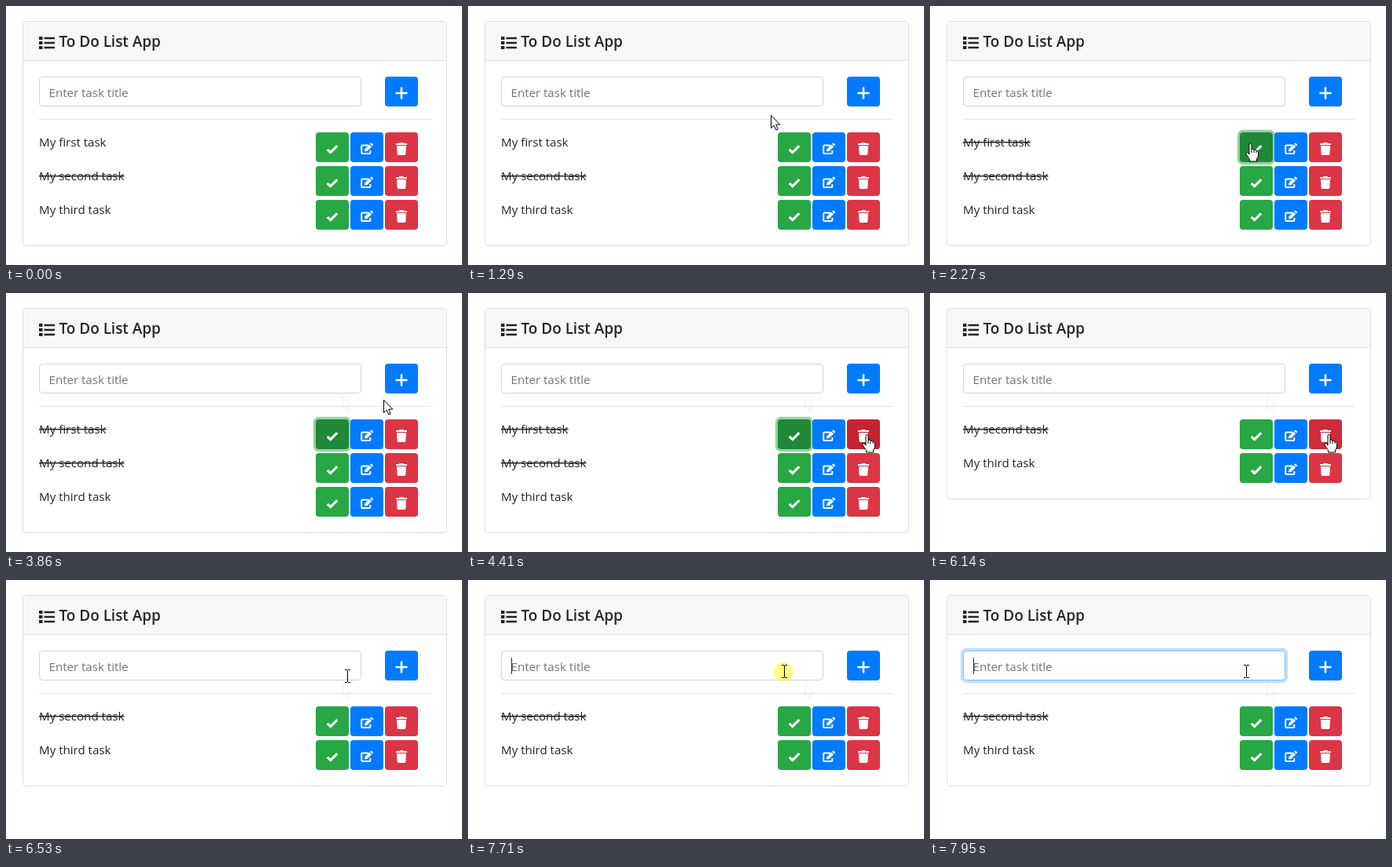
An HTML page that plays this animation: 580 by 330 pixels, repeating every 8000 ms.

```html
<!DOCTYPE html>
<html lang="en">
<head>
<meta charset="utf-8">
<title>To Do List App</title>
<style>
  html, body { margin: 0; width: 100%; height: 100%; overflow: hidden; background: #fff; }
  svg { display: block; width: 580px; height: 330px; }
  text { font: 15.1px "Open Sans", "Noto Sans", sans-serif; fill: #212529; }
  .title { font-size: 18.9px; font-weight: 600; }
  .placeholder { fill: #6c757d; }
  .done { text-decoration: line-through; }
  .pointer { stroke: #000; stroke-linejoin: round; fill: #fff; }
</style>
</head>
<body>
<svg viewBox="0 0 580 330">
  <defs>
    <path id="check" d="M-6.3 .8L-2.2 4.6L6.3 -3.8" fill="none" stroke="#fff" stroke-width="3.2"/>
    <g id="edit">
      <path d="M2 -4.6H-5.8Q-6.8 -4.6 -6.8 -3.6V5Q-6.8 6 -5.8 6H3.3Q4.3 6 4.3 5V2" fill="none" stroke="#fff" stroke-width="2"/>
      <path d="M-3 3.5L-2.6 .2L3.2 -5.6L6.1 -2.7L.3 3.1ZM4 -6.3L5 -7.2Q5.7 -7.7 6.3 -7.2L7.8 -5.7Q8.3 -5 7.8 -4.4L6.9 -3.5Z" fill="#fff"/>
    </g>
    <path id="trash" d="M-7 -7H-3.2L-2.4 -8H2.4L3.2 -7H7V-5H-7ZM-6 -4H6L5.4 6.6Q5.3 8 4 8H-4Q-5.3 8 -5.4 6.6Z" fill="#fff"/>
    <path id="arrow" class="pointer" d="M.5 .5V16.6L4.2 13.2L6.8 19L9.2 18L6.7 12.2H11.8Z"/>
    <g id="hand" class="pointer">
      <path d="M-2 1.8Q-2 .3 -.5 .3T1 1.8V7.3Q3.5 6.5 4 8.3Q6.5 7.5 7 9.3Q9.5 8.8 9.5 11.3V16Q9.5 18 7.5 20V23H-1.5V20.5L-6 13.8Q-6.5 11 -4.3 11.5L-2 14Z"/>
      <path d="M1 7.3V12M4 8.3V12M7 9.3V12" fill="none"/>
    </g>
    <path id="beam" d="M-3 -7.5H0M1 -7.5H4M.5 -7V8M-3 8.5H0M1 8.5H4" fill="none" stroke="#000"/>
  </defs>

  <rect id="card" x="21.5" y="19.5" width="539" height="286" rx="4" fill="#fff" stroke="#dfdfdf"/>
  <path d="M22 69V23.5Q22 20 25.5 20H556.5Q560 20 560 23.5V69Z" fill="#f6f7f7"/>
  <path d="M22 69.5H560" stroke="#dfdfdf"/>
  <path d="M42 41H46.5M42 47H46.5M42 53H46.5" stroke="#212529" stroke-width="4"/>
  <path d="M48.5 41H62M48.5 47H62M48.5 53H62" stroke="#212529" stroke-width="2.6"/>
  <text class="title" x="67.5" y="52">To Do List App</text>

  <rect id="inputRing" x="40.4" y="88.4" width="413.2" height="41.2" rx="5.5" fill="none" stroke="#bfdeff" stroke-width="3.2"/>
  <rect id="input" x="42.5" y="90.5" width="409" height="37" rx="4" fill="#fff"/>
  <text class="placeholder" x="54.5" y="116">Enter task title</text>
  <path id="caret" d="M55.5 99V120" stroke="#333"/>
  <rect x="482" y="90" width="42" height="38" rx="4" fill="#007bff"/>
  <path d="M496.5 111H509.5M503 104.5V117.5" stroke="#fff" stroke-width="2.6" stroke-linecap="round"/>
  <path d="M42 144.5H540" stroke="#e5e5e5"/>

  <g id="rows"></g>
  <use id="ghost" href="#arrow" x="428" y="132" opacity=".05"/>
  <circle id="click" r="12" fill="#ff0" fill-opacity=".5"/>
  <use id="cursor"/>
</svg>
<script>
const LOOP = 8000, TICK = 76, ROW_HEIGHT = 43;
const CLICK_DONE = 2030, CLICK_DELETE = 5920, CLICK_INPUT = 7710;
const REMOVED = 6070;
const bursts = [0, 680, 1530, CLICK_DONE, 3550, 4410, CLICK_DELETE, 6760, CLICK_INPUT];

// Cursor path: time, x, y
const path = [
  [680, 420, 104], [830, 395, 82], [910, 381, 73], [1060, 375, 100],
  [1288, 385, 139], [1440, 408, 175], [3500, 408, 175], [3550, 411, 163],
  [3626, 428, 132], [3702, 447, 131], [3854, 480, 136], [4082, 500, 160],
  [4310, 508, 179], [4410, 508, 180], [6148, 508, 180], [6300, 492, 152],
  [6376, 470, 134], [6528, 434, 122], [6680, 408, 117], [6912, 402, 116]
];

const $ = id => document.getElementById(id);
const set = (el, attrs) => {
  for (const name in attrs) el.setAttribute(name, attrs[name]);
};
const show = (el, visible) => set(el, { display: visible ? 'inline' : 'none' });
const ramp = (t, start) => Math.min(1, Math.max(0, (t - start) / 150));
const within = (t, from, to) => t >= from && t < to;
const mix = (a, b, k) => `rgb(${a.map((v, i) => Math.round(v + (b[i] - v) * k))})`;

const GREEN = [40, 167, 69], DARK_GREEN = [33, 136, 56];
const RED = [220, 53, 69], DARK_RED = [200, 35, 51];

const button = (x, color, icon) => `
  <rect class="${icon}" x="${x}" width="42" height="38" rx="4" fill="${color}"/>
  <use href="#${icon}" x="${x + 21}" y="21"/>`;

$('rows').innerHTML = ['My first task', 'My second task', 'My third task'].map((title, i) => `
  <g>
    <text x="42" y="18" class="${i === 1 ? 'done' : ''}">${title}</text>
    <rect class="ring" x="392.4" y="-1.6" width="45.2" height="41.2" rx="5.5"
      fill="none" stroke="#93d3a2" stroke-width="3.2" opacity="0"/>
    ${button(394, mix(GREEN, GREEN, 0), 'check')}
    ${button(438, '#007bff', 'edit')}
    ${button(482, mix(RED, RED, 0), 'trash')}
  </g>`).join('');
const rows = [...$('rows').children];
const part = (row, name) => rows[row].querySelector(name);

function hold(t) {
  const start = bursts.findLast(b => b <= t);
  return start + Math.floor((t - start) / TICK) * TICK;
}

function cursorAt(t) {
  const next = path.findIndex(p => p[0] > t);
  if (next < 0) return path.at(-1).slice(1);
  if (next === 0) return path[0].slice(1);
  const [t0, x0, y0] = path[next - 1], [t1, x1, y1] = path[next];
  const k = (t - t0) / (t1 - t0);
  return [Math.round(x0 + (x1 - x0) * k), Math.round(y0 + (y1 - y0) * k)];
}

function cursorShape(x, y) {
  if (x < 452 && y >= 90 && y < 128) return '#beam';
  return x >= 394 && x < 524 && y >= 161 && y < 199 ? '#hand' : '#arrow';
}

function draw(time) {
  const t = hold(time);
  const removed = t >= REMOVED;

  rows.forEach((row, i) => set(row, {
    transform: `translate(0 ${161 + (i - removed) * ROW_HEIGHT})`
  }));
  show(rows[0], !removed);
  set($('card'), { height: 286 - removed * ROW_HEIGHT });

  part(0, 'text').classList.toggle('done', t >= CLICK_DONE + TICK);
  set(part(0, '.ring'), { opacity: ramp(t, CLICK_DONE) });
  set(part(0, '.check'), { fill: mix(GREEN, DARK_GREEN, ramp(t, 1440)) });
  set(part(0, '.trash'), { fill: mix(RED, DARK_RED, ramp(t, 4080)) });
  set(part(1, '.trash'), {
    fill: mix(RED, DARK_RED, ramp(t, REMOVED - 80) * removed * (1 - ramp(t, 6220)))
  });

  const focus = ramp(t, CLICK_INPUT);
  set($('inputRing'), { opacity: focus });
  set($('input'), { stroke: mix([206, 212, 218], [128, 189, 255], focus) });
  show($('caret'), t >= CLICK_INPUT);
  show($('ghost'), t >= 3702);

  const [x, y] = cursorAt(t);
  show($('cursor'), t >= 680);
  set($('cursor'), { href: cursorShape(x, y), x, y });
  const clicking = [CLICK_DONE, CLICK_DELETE, CLICK_INPUT]
    .some(start => within(t, start, start + 2 * TICK));
  show($('click'), clicking);
  set($('click'), { cx: x - 1, cy: y + 1 });
}

const begin = performance.now();
function frame() {
  draw((performance.now() - begin) % LOOP);
  requestAnimationFrame(frame);
}
frame();
</script>
</body>
</html>
```
